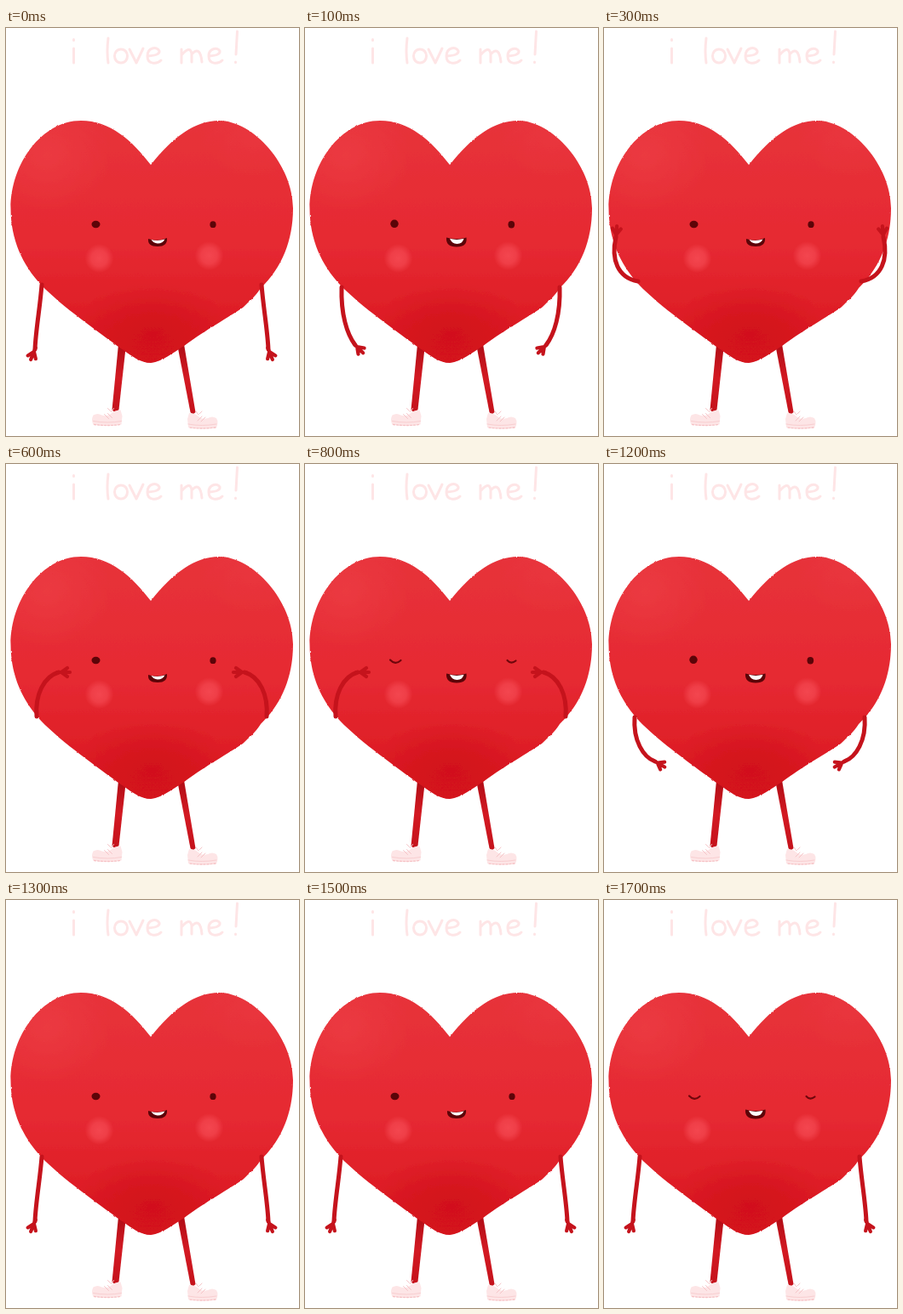
Recreate the animation shown at these times as an HTML page. Size 344 px wide and 480 px high, loop 1800 ms.

```html
<!DOCTYPE html>
<html lang="en">
<head>
<meta charset="utf-8">
<title>i love me!</title>
<style>
  html, body { margin: 0; width: 100%; height: 100%; overflow: hidden; background: #fff; }
  svg { display: block; width: 344px; height: 480px; }
  .line { fill: none; stroke-linecap: round; stroke-linejoin: round; }
</style>
</head>
<body>
<svg viewBox="0 0 344 480">
  <defs>
    <linearGradient id="skin" x1="0" y1="0" x2="0" y2="1">
      <stop offset="0" stop-color="#e7323a"/>
      <stop offset=".5" stop-color="#e62a32"/>
      <stop offset="1" stop-color="#d9161f"/>
    </linearGradient>
    <linearGradient id="legs" x1="0" y1="0" x2="0" y2="1">
      <stop offset="0" stop-color="#b00c15"/>
      <stop offset=".5" stop-color="#d31a23"/>
      <stop offset="1" stop-color="#c4121b"/>
    </linearGradient>
    <radialGradient id="shine">
      <stop offset="0" stop-color="#f2494f" stop-opacity=".4"/>
      <stop offset="1" stop-color="#f2494f" stop-opacity="0"/>
    </radialGradient>
    <radialGradient id="shade">
      <stop offset="0" stop-color="#cc0b16" stop-opacity=".65"/>
      <stop offset=".4" stop-color="#cc0b16" stop-opacity=".45"/>
      <stop offset="1" stop-color="#cc0b16" stop-opacity="0"/>
    </radialGradient>
    <radialGradient id="blush">
      <stop offset="0" stop-color="#f3464f"/>
      <stop offset=".55" stop-color="#f3464f" stop-opacity=".75"/>
      <stop offset="1" stop-color="#f3464f" stop-opacity="0"/>
    </radialGradient>
    <filter id="rough" x="-5%" y="-5%" width="110%" height="110%">
      <feTurbulence type="fractalNoise" baseFrequency=".35" numOctaves="2" seed="4"/>
      <feDisplacementMap in="SourceGraphic" scale="2" xChannelSelector="R" yChannelSelector="G"/>
    </filter>
    <path id="heart" d="M170 161C148 132 122 109 88 109C42 109 5.500 160 5.500 212C5.500 250 20 279 41 302C66 328 108 357 135 377C148 386 158 394 170 394C184 392 196 382 209 374C236 354 262 340 278 329C285 322 293 316 299 306C324 282 337 250 337 212C337 162 291 109 250 109C222 109 196 128 170 161Z"/>
    <clipPath id="inside"><use href="#heart"/></clipPath>
    <g id="arm" class="line" stroke="#c5131c">
      <path id="limb" stroke-width="5"/>
      <path id="hand" stroke-width="4.200" d="M-2 0L3 0L10 5M3 0L13 0M3 0L10 -5"/>
    </g>
    <g id="shoe">
      <path fill="#fde5e6" d="M1 6Q6 3 11 6Q18 8 22 4Q26 0 33 0L35 7L34 17Q17 20 1 17Q-2 11 1 6Z"/>
      <path class="line" stroke="#f8ced0" stroke-width="1" d="M1 13Q18 16 34 13"/>
      <path class="line" stroke="#f6c3c6" stroke-width="1.3" stroke-dasharray="2 2" d="M2 17Q18 19 33 17"/>
      <path class="line" stroke="#f5c4c7" stroke-width="1" d="M14 5L19 10M18 4L23 9M21 1L18 -2M22 2L25 -2"/>
    </g>
  </defs>

  <g class="line" stroke="#fee5e6" stroke-width="3" role="img" aria-label="i love me!">
    <path d="M79.500 24V41M79.500 13.500V14.500"/>
    <path d="M120 12Q118 28 120 41M135 25C125 25 125 41 135 41C145 41 145 25 135 25M145 25L153 41L161 24"/>
    <path d="M167 33Q181 32 180 27C177 21 166 23 166 33C166 43 177 43 182 38"/>
    <path d="M206 25V41M206 32Q216 20 218 30V40M218 31Q228 20 230 40"/>
    <path d="M239 33Q252 32 251 27C248 22 238 24 238 33C238 43 249 43 254 38"/>
    <path d="M271.500 4L270 31M269.500 40V40.500"/>
  </g>

  <g fill="url(#legs)">
    <path d="M132 372H141L132.500 449Q128 454 124.500 449Z"/>
    <path d="M201 372H209L222.500 452Q219 456 216.500 452Z"/>
  </g>
  <use href="#shoe" x="101.500" y="449.500"/>
  <use href="#shoe" transform="translate(248 453) scale(-1 1)"/>

  <g filter="url(#rough)">
    <use href="#heart" fill="url(#skin)"/>
    <g clip-path="url(#inside)">
      <ellipse cx="48" cy="150" rx="75" ry="65" fill="url(#shine)"/>
      <ellipse cx="290" cy="130" rx="62" ry="45" fill="url(#shine)" opacity=".5"/>
      <ellipse cx="172" cy="360" rx="95" ry="62" fill="url(#shade)"/>
    </g>
  </g>
  <circle cx="109.500" cy="271" r="17" fill="url(#blush)"/>
  <circle cx="238.500" cy="268" r="17" fill="url(#blush)"/>

  <g fill="#5c0408">
    <g id="eyes">
      <ellipse id="leftEye"/>
      <ellipse id="rightEye"/>
    </g>
    <path id="lids" class="line" style="fill:none" stroke="#70060b" stroke-width="2.200" d="M100 230.500Q106 237 112.500 231M237.500 231Q242 236 247.500 231.500"/>
    <path id="mouth"/>
    <path id="teeth" fill="#fff"/>
  </g>

  <use href="#arm"/>
  <use href="#arm" transform="translate(342 0) scale(-1 1)"/>
</svg>
<script>
const $ = id => document.getElementById(id);
const set = (id, attrs) => {
  for (const name in attrs) $(id).setAttribute(name, attrs[name]);
};

// Each pose: shoulder, two bend points, wrist, hand angle
const poses = {
  down:   [42, 302, 40, 328, 35, 355, 34, 378, 112],
  inward: [43, 305, 42, 336, 49, 360, 59, 373, 45],
  out:    [41, 300, 32, 325, 20, 338, 10, 343, 150],
  up:     [40, 298, 16, 294, 8, 272, 14, 246, -85],
  over:   [38, 298, 14, 288, 14, 256, 34, 240, -50],
  near:   [37, 298, 26, 274, 34, 250, 52, 242, -25],
  cheek:  [36, 297, 34, 272, 44, 250, 62, 245, 0],
  lower:  [36, 298, 34, 325, 46, 345, 60, 350, 30]
};

// One entry per 100 ms
const arms = ["down", "inward", "out", "up", "over", "near",
  ...Array(6).fill("cheek"), "lower", ...Array(5).fill("down")];
// s = smile, o = open mouth, c = open mouth with closed eyes
const faces = "soosoosocssoososoc";

const moods = {
  smile: {
    mouth: { d: "M167 248Q178 252 189 247Q190 257 178 257Q166 257 167 248Z" },
    teeth: { d: "M170.5 249Q178 251 186.5 248.5Q184 253.5 178 253.5Q173 253 170.5 249Z" },
    leftEye: { cx: 105.5, cy: 231, rx: 5, ry: 4.2 },
    rightEye: { cx: 243, cy: 231.2, rx: 3.6, ry: 3.9 }
  },
  open: {
    mouth: { d: "M166 246.5Q178 249.5 189.5 246.500Q191 257.5 178 257.5Q165 257.5 166 246.5Z" },
    teeth: { d: "M170 247.8Q178 250 186.5 247.8Q185 254 178.5 254Q172 253.5 170 247.8Z" },
    leftEye: { cx: 105, cy: 230.3, rx: 4.7, ry: 4.8 },
    rightEye: { cx: 242.3, cy: 231.2, rx: 3.8, ry: 4.2 }
  }
};

function drawArms([sx, sy, ax, ay, bx, by, wx, wy, angle]) {
  set("limb", { d: `M${sx} ${sy}C${ax} ${ay} ${bx} ${by} ${wx} ${wy}` });
  set("hand", { transform: `translate(${wx} ${wy}) rotate(${angle})` });
}

function drawFace(face) {
  const closed = face === "c";
  const mood = moods[face === "s" ? "smile" : "open"];
  for (const part in mood) set(part, mood[part]);
  set("eyes", { visibility: closed ? "hidden" : "visible" });
  set("lids", { visibility: closed ? "visible" : "hidden" });
}

const start = performance.now();
function tick() {
  const step = Math.floor((performance.now() - start) % 1800 / 100);
  drawArms(poses[arms[step]]);
  drawFace(faces[step]);
  requestAnimationFrame(tick);
}
tick();
</script>
</body>
</html>
```
